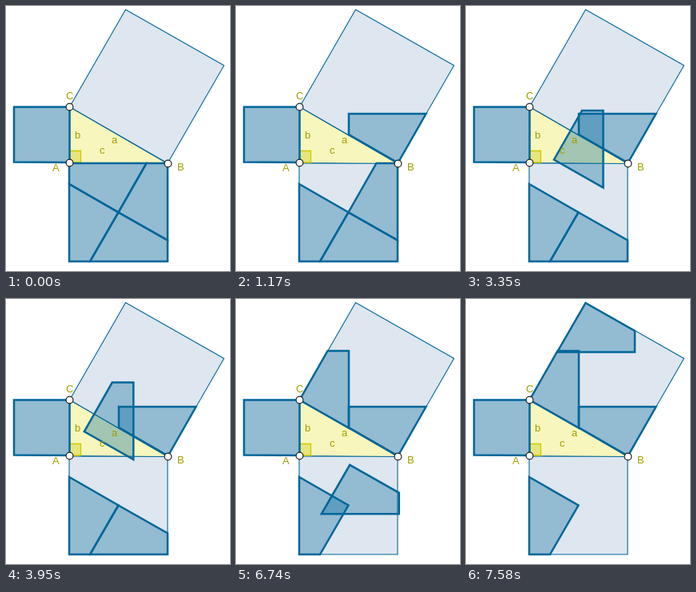
An HTML page for the animation above (8 s loop, 280x332 px).

```html
<!DOCTYPE html>
<html lang="en">
<head>
<meta charset="utf-8">
<title>Pythagorean dissection</title>
<style>
  html, body { margin: 0; width: 100%; height: 100%; overflow: hidden; background: #fff; }
  svg { display: block; width: 280px; height: 332px; }
  .area { fill: #dee6ef; stroke: #069; stroke-width: 1.1; }
  .piece { fill: #069; fill-opacity: .34; stroke: #069; stroke-width: 2.5; }
  .triangle { fill: #f7f6bd; stroke: #069; stroke-width: 1.1; }
  .angle { fill: #e8e57c; stroke: #cc0; stroke-width: 1.3; }
  circle { fill: #fff; stroke: #222; stroke-width: 1.2; }
  text { font: 13px "Liberation Sans", Arial, sans-serif; fill: #a0a000; }
</style>
</head>
<body>
<svg viewBox="0 0 280 332">
  <path class="area" d="M10 126.5H79.5V195.5H10Z"/>
  <path class="area" d="M79 197H202V320H79Z"/>
  <path class="area" d="M79.5 126.5L149.5 4.5L272.5 74.5L202 197Z"/>
  <path class="triangle" d="M79.5 126.5V196.5L202 197.5Z"/>
  <path class="angle" d="M79.5 181.5H93.5V196H79.5Z"/>

  <path class="piece" d="M10 126.5H79.5V196L10 195.5Z"/>
  <path class="piece" d="M79 223L140.5 258.5L105 320H79Z"/>
  <path class="piece" id="left" d="M79 197H175.5L140.5 258.5L79 223Z"/>
  <path class="piece" id="right" d="M175.5 197H202V293.5L140.5 258.5Z"/>
  <path class="piece" id="bottom" d="M140.5 258.5L202 293.5V320H105Z"/>

  <circle cx="79.5" cy="196.5" r="4.4"/>
  <circle cx="202.5" cy="197.5" r="4.4"/>
  <circle cx="79.5" cy="126.5" r="4.4"/>
  <text x="58" y="207">A</text>
  <text x="214" y="206">B</text>
  <text x="75" y="117">C</text>
  <text x="132" y="172">a</text>
  <text x="86" y="166">b</text>
  <text x="117" y="185">c</text>
</svg>
<script>
const LOOP = 8000;

// Each piece slides along (dx, dy) in hard steps of [time in ms, fraction of the way].
const slides = [
  { id: "left", dx: 62, dy: -62, steps: [
    [530, .2], [590, .3], [650, .5], [710, .6], [910, .7], [1110, .8], [1170, 1]] },
  { id: "right", dx: -61, dy: -132, steps: [
    [3170, .2], [3230, .3], [3290, .4], [3350, .5], [3750, .6],
    [3950, .7], [4150, .8], [4210, .9], [4410, 1]] },
  { id: "bottom", dx: 9, dy: -253.5, steps: [
    [6740, .2], [6800, .3], [6860, .5], [6920, .7], [7050, .8], [7250, .9], [7580, 1]] },
];

function progress(steps, time) {
  let value = 0;
  for (const [start, fraction] of steps) if (time >= start) value = fraction;
  return value;
}

function draw() {
  const time = performance.now() % LOOP;
  for (const { id, dx, dy, steps } of slides) {
    const k = progress(steps, time);
    document.getElementById(id).setAttribute("transform", `translate(${dx * k} ${dy * k})`);
  }
  requestAnimationFrame(draw);
}
draw();
</script>
</body>
</html>
```
